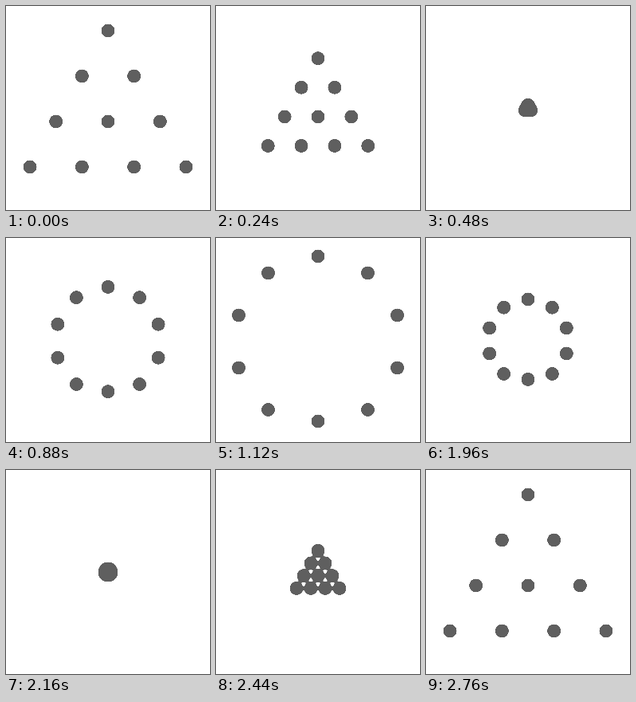
Animation, 256 px wide and 256 px high, one loop 4.64 s. Source, as an HTML page:

```html
<!DOCTYPE html>
<html lang="en">
<head>
<meta charset="utf-8">
<title>Dots</title>
<style>
  html, body { margin: 0; width: 100%; height: 100%; overflow: hidden; background: #fff; }
  svg { display: block; width: 100%; height: 100%; }
</style>
</head>
<body>
<svg viewBox="0 0 256 256">
  <filter id="goo" filterUnits="userSpaceOnUse" x="0" y="0" width="256" height="256"
          color-interpolation-filters="sRGB">
    <feGaussianBlur stdDeviation="1.5"/>
    <feColorMatrix values="1 0 0 0 0  0 1 0 0 0  0 0 1 0 0  0 0 0 18 -8"/>
  </filter>
  <g id="dots" fill="#5f5f5f" filter="url(#goo)"></g>
</svg>
<script>
const LOOP = 4640, STEP = 40, CENTER = 128, RADIUS = 8.5;
const ROWS = 4, GAP_X = 65.3, GAP_Y = 57, TOP = -97;

// Offsets from the center at full size.
const triangle = [];
for (let row = 0; row < ROWS; row++) {
  for (let col = 0; col <= row; col++) {
    triangle.push([(col - row / 2) * GAP_X, TOP + row * GAP_Y]);
  }
}

// The ring is two poles plus its right side, mirrored.
const ring = [[0, -105], [0, 102]];
for (const [x, y] of [[62.5, -84], [99.5, -31], [99.5, 35], [62.5, 87.5]]) {
  ring.push([x, y], [-x, y]);
}

const group = document.getElementById('dots');
const dots = triangle.map(() => {
  const dot = document.createElementNS('http://www.w3.org/2000/svg', 'circle');
  dot.setAttribute('r', RADIUS);
  return group.appendChild(dot);
});

// Cubic bezier easing with control points (a, 0) and (b, 1).
function ease(x, a, b) {
  if (x <= 0) return 0;
  if (x >= 1) return 1;
  let lo = 0, hi = 1;
  for (let i = 0; i < 24; i++) {
    const u = (lo + hi) / 2, v = 1 - u;
    if (3 * v * v * u * a + 3 * v * u * u * b + u * u * u < x) lo = u;
    else hi = u;
  }
  return lo * lo * (3 - 2 * lo);
}

const collapse = (t, start) => 1 - ease((t - start) / 520, 0.385, 0.39);
const expand = (t, start) => ease((t - start) / 460, 0.405, 0.355);

function pose(t) {
  if (t < 640) return [triangle, collapse(t, 60)];
  if (t < 1740) return [ring, expand(t, 660)];
  if (t < 2300) return [ring, collapse(t, 1740)];
  return [triangle, expand(t, 2300)];
}

function draw(time) {
  const t = Math.floor((time % LOOP) / STEP) * STEP;
  const [shape, scale] = pose(t);
  dots.forEach((dot, i) => {
    const [x, y] = shape[i];
    dot.setAttribute('cx', CENTER + x * scale);
    dot.setAttribute('cy', CENTER + y * scale);
  });
}

let origin = null;
function tick(now) {
  if (origin === null) origin = now;
  draw(now - origin);
  requestAnimationFrame(tick);
}
draw(0);
requestAnimationFrame(tick);
</script>
</body>
</html>
```
